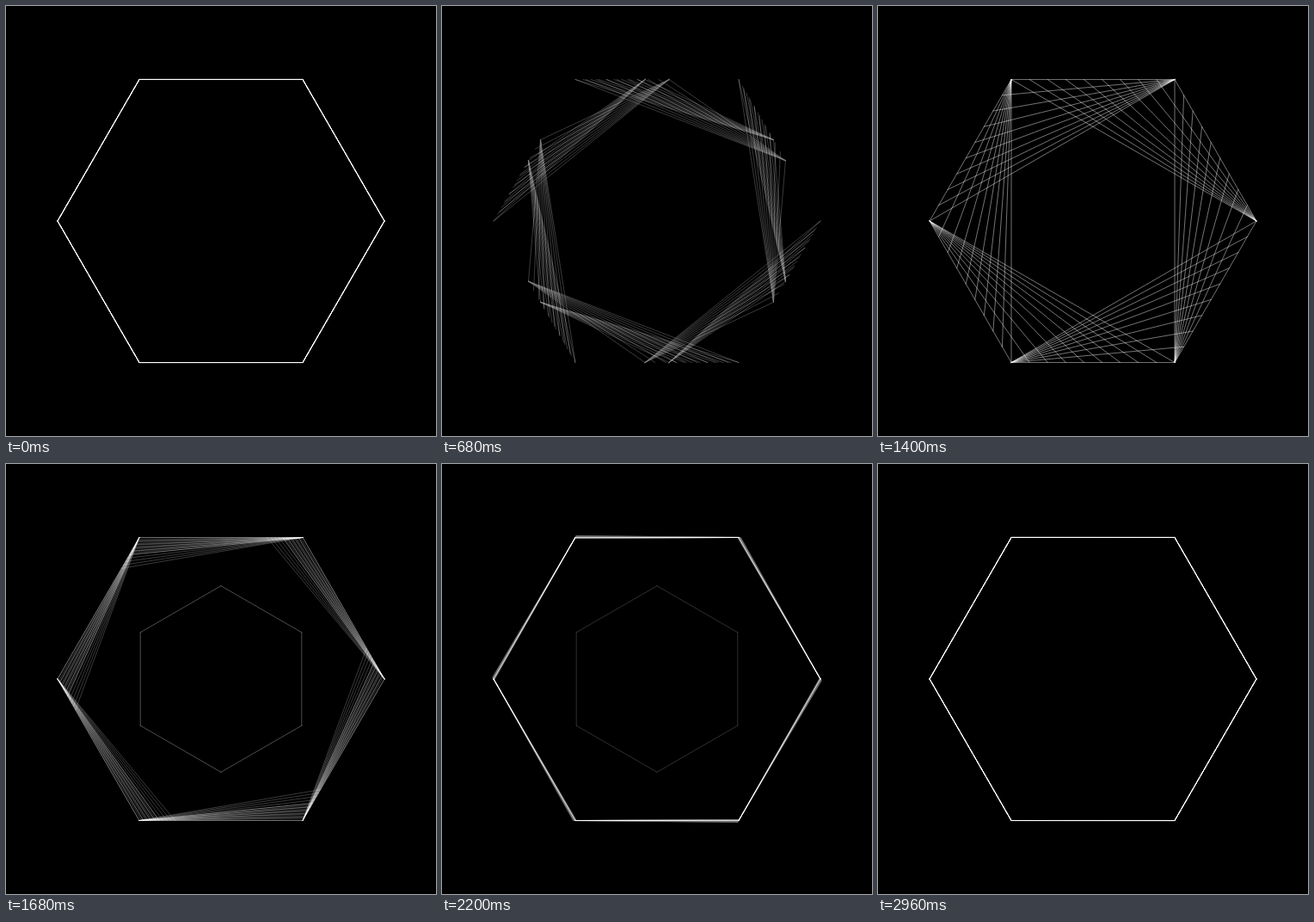
These frames come from a looping animation (500x500 px, 3 s). An HTML page with a canvas:

```html
<!DOCTYPE html>
<html lang="en">
<head>
<meta charset="utf-8">
<title>Hexagon fan</title>
<style>
  html, body { margin: 0; width: 100%; height: 100%; overflow: hidden; background: #000; }
  canvas { display: block; }
</style>
</head>
<body>
<canvas id="stage" width="500" height="500"></canvas>
<script>
const SIZE = 500, CENTER = 250, RADIUS = 190, INNER = 108.3;
const LOOP = 3000, STEP = 40, LAYERS = 10;
const FAN_END = 1400, SNAP = 1440, PEAK = 1588;
const OVERSHOOT = 0.41, PERIOD = 283, DECAY = 0.0046;
const LINE_ALPHA = 0.45, INNER_ALPHA = 0.36;

const screen = document.getElementById('stage').getContext('2d');
const layer = document.createElement('canvas');
layer.width = layer.height = SIZE;
const pen = layer.getContext('2d');
pen.lineCap = 'round';
pen.lineWidth = 1;

function corner(k, r = RADIUS, turn = 0) {
  const a = k * Math.PI / 3 + turn;
  return [CENTER + r * Math.cos(a), CENTER + r * Math.sin(a)];
}

// Point on side k; p beyond 1 lies on the side's extension.
function onSide(k, p) {
  const [ax, ay] = corner(k), [bx, by] = corner(k + 1);
  return [ax + (bx - ax) * p, ay + (by - ay) * p];
}

function line(a, b, alpha) {
  pen.strokeStyle = `rgba(255,255,255,${alpha})`;
  pen.beginPath();
  pen.moveTo(...a);
  pen.lineTo(...b);
  pen.stroke();
}

function easeInOut(x, power) {
  x = Math.min(1, Math.max(0, x));
  return x < 0.5 ? 0.5 * (2 * x) ** power : 1 - 0.5 * (2 - 2 * x) ** power;
}

// Fast pull past the corner, then damped ringing around it.
function snap(t) {
  if (t <= SNAP) return 0;
  if (t < PEAK) {
    const x = (t - SNAP) / (PEAK - SNAP);
    return (1 + OVERSHOOT) * (1 - Math.cos(Math.PI * x)) / 2;
  }
  const d = t - PEAK;
  return 1 + OVERSHOOT * Math.exp(-DECAY * d) * Math.cos(2 * Math.PI * d / PERIOD);
}

function drawPose(t) {
  pen.fillStyle = '#000';
  pen.fillRect(0, 0, SIZE, SIZE);
  const head = easeInOut(t / FAN_END, 5.5);
  const pull = snap(t);
  for (let i = 0; i < LAYERS; i++) {
    const share = i / (LAYERS - 1);
    const tail = head * share + (1 - share) * pull;
    for (let k = 0; k < 6; k++) line(onSide(k, tail), onSide(k + 1, head), LINE_ALPHA);
  }
  if (t > SNAP) {
    const alpha = INNER_ALPHA * (LOOP - t) / (LOOP - SNAP);
    const turn = Math.PI / 6;
    for (let k = 0; k < 6; k++) line(corner(k, INNER, turn), corner(k + 1, INNER, turn), alpha);
  }
}

function frame() {
  const t = Math.floor(performance.now() % LOOP / STEP) * STEP;
  screen.globalCompositeOperation = 'source-over';
  screen.globalAlpha = 1;
  screen.fillStyle = '#000';
  screen.fillRect(0, 0, SIZE, SIZE);
  // Blend two neighbouring poses as motion blur.
  screen.globalCompositeOperation = 'lighter';
  screen.globalAlpha = 0.5;
  for (const shift of [0, STEP]) {
    drawPose((t + shift) % LOOP);
    screen.drawImage(layer, 0, 0);
  }
  requestAnimationFrame(frame);
}
frame();
</script>
</body>
</html>
```
